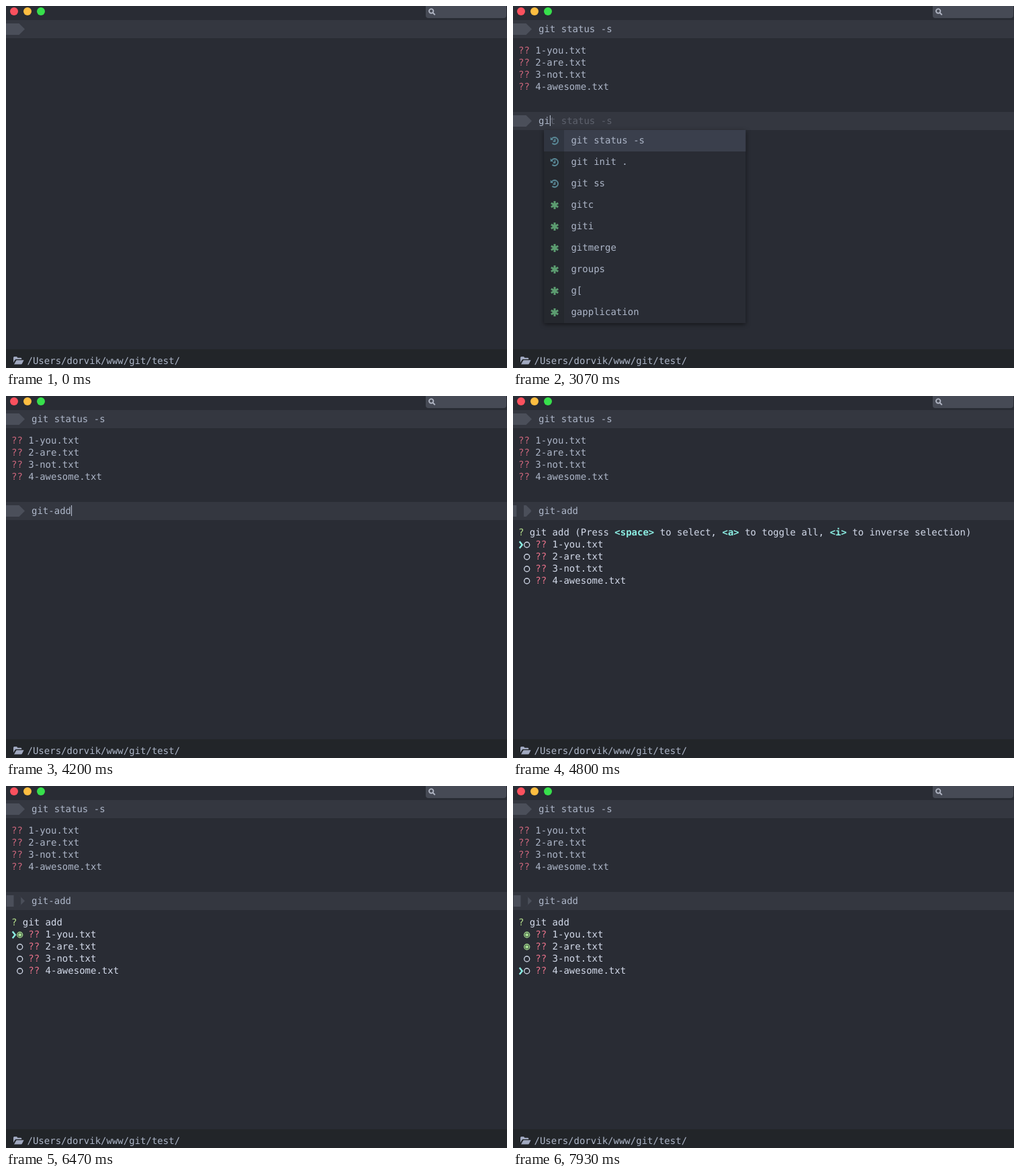
Recreate the animation shown at these times as an HTML page. Size 746 by 540 pixels, loop 8 s.

```html
<!DOCTYPE html>
<html lang="en">
<head>
<meta charset="utf-8">
<title>Terminal</title>
<style>
  html, body { margin: 0; width: 100%; height: 100%; overflow: hidden; background: #292c34; }
  svg { display: block; width: 746px; height: 540px; }
  text { font: 14px "DejaVu Sans Mono", monospace; white-space: pre; text-rendering: geometricPrecision; fill: #adb6c8; }
  .bold { font-weight: bold; fill: #8ceee3; }
  .ghost { fill: #5d616c; }
  .popup { filter: drop-shadow(0 2px 3px rgba(0, 0, 0, .5)); }
</style>
</head>
<body>
<svg viewBox="0 0 746 540">
  <defs>
    <clipPath id="tip"><path d="M0 5H19.5L28 13.5L19.5 22H0Z"/></clipPath>
    <g id="history" fill="none" stroke="#598896" stroke-width="1.9">
      <path d="M-4.2-2.9A5.1 5.1 0 1 1-3.6 3.8M.4-2.8V.8H-2.3"/>
      <path d="M-6.3-5.6V-1.1H-1.8Z" fill="#598896" stroke="none"/>
    </g>
    <path id="star" d="M0-6V6M-5.2-3L5.2 3M-5.2 3L5.2-3" stroke="#5c9c70" stroke-width="3"/>
  </defs>
  <rect width="746" height="540" fill="#292c34"/>
  <circle cx="12" cy="8" r="6" fill="#f9515e"/>
  <circle cx="32" cy="8" r="6" fill="#fdbd41"/>
  <circle cx="52" cy="8" r="6" fill="#37e04c"/>
  <rect x="625" y="-6" width="120" height="24" rx="4" fill="#464a55"/>
  <g fill="none" stroke="#b0b5c3" stroke-width="1.9">
    <circle cx="633.2" cy="7.6" r="3.2"/>
    <path d="M635.5 10L638.8 13.2"/>
  </g>
  <g id="screen"></g>
  <rect y="512" width="746" height="28" fill="#222529"/>
  <g fill="#a0a8bf">
    <path d="M11 532V524.5Q11 523 12.5 523H16L17.5 524.8H22Q23.2 524.8 23.2 526V527H15.2Q14 527 13.3 528Z"/>
    <path d="M12 534.6L15 528.9Q15.4 528.2 16.2 528.2H26.6L23.8 533.8Q23.4 534.6 22.6 534.6Z"/>
  </g>
  <text x="31.5" y="534">/Users/dorvik/www/git/test/</text>
</svg>
<script>
const LOOP = 8000, CHAR = 8.43, LEFT = 38, LINE = 18;
const FILES = ['1-you.txt', '2-are.txt', '3-not.txt', '4-awesome.txt'];
const screen = document.getElementById('screen');

// Suggestions starting with "!" come from the history.
const GIT = ['!git status -s', '!git init .', '!git ss', 'gitc', 'giti', 'gitmerge'];
const DASH = ['!git-add', 'git-cvsserver', 'git-receive-pack', 'git-shell', 'git-upload-archive', 'git-upload-pack'];

// [time, typed text, ghost text]
const KEYS = [
  [0, '', ''],
  [2870, 'g', 'it status -s'],
  [3060, 'gi', 't status -s'],
  [3230, 'git', ' status -s'],
  [3460, 'git-', 'add'],
  [3760, 'git-a', 'dd'],
  [3900, 'git-ad', 'd'],
  [4060, 'git-add', '']
];
// [time, caret column, items]
const POPUPS = [
  [0, 0, []],
  [2930, 1, [...GIT, 'groups', 'g[', 'gapplication']],
  [3140, 2, GIT],
  [3300, 3, GIT],
  [3530, 4, DASH],
  [3830, 5, ['!git-add']],
  [3970, 6, ['!git-add']],
  [4130, 0, []]
];
// [time, pointer row, number of ticked rows]
const PICKS = [[4730, 0, 0], [6000, 0, 1], [6600, 1, 1], [6930, 1, 2], [7330, 2, 2], [7670, 3, 2]];

const latest = (list, t) => list.findLast(e => e[0] <= t);
const esc = s => s.replace(/</g, '&lt;');
const rect = (x, y, w, h, fill) => `<rect x="${x}" y="${y}" width="${w}" height="${h}" fill="${fill}"/>`;
const text = (x, y, s, fill) =>
  `<text x="${x}" y="${y}"${fill ? ` style="fill:${fill}"` : ''}>${s}</text>`;
const cursor = (col, y, alpha = 1) =>
  `<rect x="${LEFT + col * CHAR}" y="${y}" width="1.1" height="16" fill="#b4bccd" opacity="${alpha.toFixed(2)}"/>`;

function prompt(y, command, ghost, busy, t) {
  let arrow = rect(0, 0, 28, 27, '#4b4f5a');
  if (busy) {
    const shift = (5.3 + 21.5 * (t - 4800) / 730) % 21.5;
    for (const k of [-2, -1, 0, 1, 2]) arrow += rect(shift + 21.5 * k, 0, 10.7, 27, '#343740');
  }
  return `<g transform="translate(0 ${y})">${rect(0, 0, 746, 27, '#343740')}<g clip-path="url(#tip)">${arrow}</g>` +
    text(LEFT, 18, `${command}<tspan class="ghost">${ghost}</tspan>`) + '</g>';
}

function popup(col, items) {
  const rows = items.map((item, i) => {
    const past = item[0] === '!', y = i * 32;
    return (i ? '' : rect(0, 0, 300, 32, '#3a3f4c')) +
      rect(0, y, 29.5, 32, i ? '#25282e' : '#303540') +
      `<use href="#${past ? 'history' : 'star'}" x="15.6" y="${y + 16}"/>` +
      text(40, y + 20, past ? item.slice(1) : item);
  });
  return `<g class="popup" transform="translate(${LEFT + col * CHAR} 185)">` +
    rect(0, 0, 300, 32 * items.length, '#292c34') + rows.join('') + '</g>';
}

function picker([, pointer, ticked]) {
  const white = '#d3daea';
  const bold = s => `<tspan class="bold">${esc(s)}</tspan>`;
  const help = ticked ? '' :
    ` (Press ${bold('<space>')} to select, ${bold('<a>')} to toggle all, ${bold('<i>')} to inverse selection)`;
  let out = text(8, 208, '?', '#b4df8c') + text(8 + 2 * CHAR, 208, 'git add' + help, white);
  FILES.forEach((file, i) => {
    const y = 226 + i * LINE, on = i < ticked, color = on ? '#a5df8f' : white;
    if (i === pointer)
      out += `<path d="M9.7 ${y - 9}L13.7 ${y - 4}L9.7 ${y + 1}" fill="none" stroke="#8ceee3" stroke-width="2.4"/>`;
    out += `<circle cx="20.7" cy="${y - 4}" r="4" fill="none" stroke="${color}" stroke-width="1.3"/>`;
    if (on) out += `<circle cx="20.7" cy="${y - 4}" r="2.5" fill="${color}"/>`;
    out += text(8 + 3 * CHAR, y, '??', '#e8728a') + text(8 + 6 * CHAR, y, file, white);
  });
  return out;
}

// Solid, fade out, hidden, fade in, once per second.
function blink(ms) {
  const p = ms % 1000 / 1000;
  if (p < .45) return 1;
  if (p < .6) return (.6 - p) / .15;
  return p < .85 ? 0 : (p - .85) / .15;
}

function scene(t) {
  let out = prompt(21, t < 70 ? '' : 'git status -s', '', t >= 600 && t < 1080, t);
  if (t >= 70 && t < 600) out += cursor(13, 26);
  if (t >= 870) FILES.forEach((file, i) => {
    const y = 71 + i * LINE;
    out += text(8, y, '??', '#cb667c') + text(8 + 3 * CHAR, y, file);
  });
  if (t < 1080) return out;

  const [, typed, ghost] = latest(KEYS, t);
  const busy = t >= 4260;
  out += prompt(158, typed, ghost, busy, t);
  if (!busy) out += cursor(typed.length, 163, typed ? 1 : blink(t - 1080));
  const [, col, items] = latest(POPUPS, t);
  if (items.length) out += popup(col, items);
  const pick = latest(PICKS, t);
  return pick ? out + picker(pick) : out;
}

let shown;
const start = performance.now();
function draw() {
  const next = scene((performance.now() - start) % LOOP);
  if (next !== shown) screen.innerHTML = shown = next;
  requestAnimationFrame(draw);
}
draw();
</script>
</body>
</html>
```
